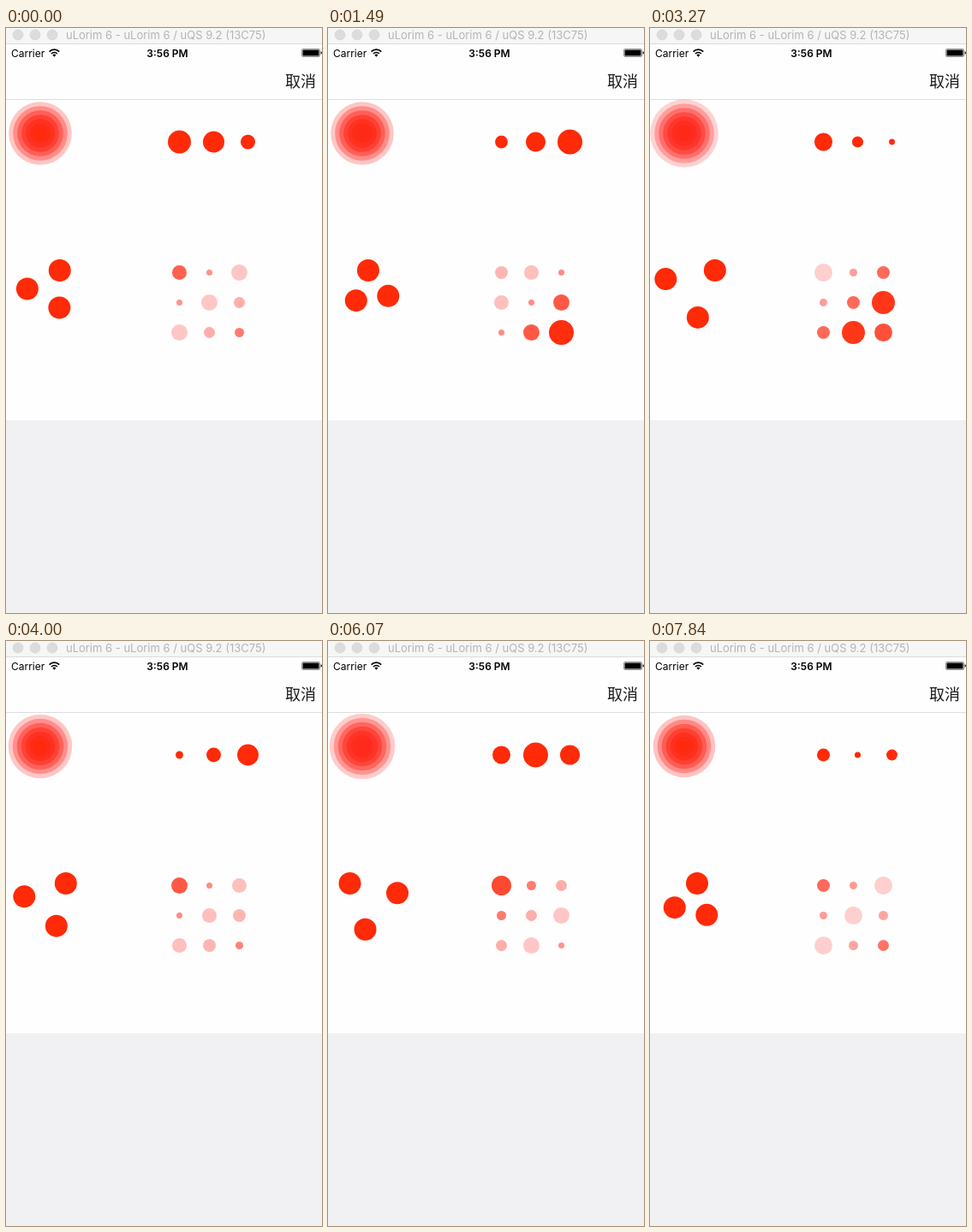
These frames come from a looping animation (369 by 683 pixels, 7990 ms). An HTML page with a canvas:

```html
<!DOCTYPE html>
<html lang="zh-CN">
<head>
<meta charset="utf-8">
<title>Loading indicators</title>
<style>
  html, body { margin: 0; width: 100%; height: 100%; overflow: hidden; background: #f1f1f3; }
  svg, canvas { position: absolute; left: 0; top: 0; width: 369px; height: 683px; display: block; }
  text { font-family: Inter, Roboto, sans-serif; }
  .title { font-size: 13px; fill: #b4b4b4; }
  .status { font-size: 12px; }
  .time { font-weight: 600; text-anchor: middle; }
  .cancel { font: 18px "Noto Sans CJK SC", "Noto Sans CJK", sans-serif; fill: #1c1c1c; }
</style>
</head>
<body>
<svg viewBox="0 0 369 683">
  <rect width="369" height="18" fill="#f6f6f6"/>
  <rect y="18" width="369" height="1" fill="#dcdcdc"/>
  <rect y="19" width="369" height="439" fill="#fefefe"/>
  <rect y="83" width="369" height="1" fill="#dedede"/>
  <g fill="#dcdcdc" stroke="#d2d2d2" stroke-width=".6">
    <circle cx="14" cy="8" r="6"/>
    <circle cx="34" cy="8" r="6"/>
    <circle cx="54" cy="8" r="6"/>
  </g>
  <text class="title" x="70" y="13">uLorim 6 - uLorim 6 / uQS 9.2 (13C75)</text>
  <text class="status" x="6" y="34">Carrier</text>
  <g fill="none" stroke="#000" stroke-width="1.7">
    <path d="M50.6 27.6a8.2 8.2 0 0 1 11.6 0"/>
    <path d="M52.9 30a5 5 0 0 1 7 0"/>
  </g>
  <path d="M54.4 31.5a2.9 2.9 0 0 1 4 0l-2 2.2z"/>
  <text class="status time" x="188.5" y="34">3:56 PM</text>
  <rect x="345.5" y="24.5" width="21" height="9" rx="1.5" fill="none" stroke="#777" stroke-width=".8"/>
  <rect x="346.5" y="25.5" width="19" height="7" rx=".6"/>
  <path d="M367.6 27.3q1.4 .3 1.4 1.7t-1.4 1.7z"/>
  <text class="cancel" x="326" y="68.5">取消</text>
</svg>
<canvas></canvas>
<script>
  const LOOP = 7990, FRAMES = 54, FRAME_MS = 147.9, STEP = 0.15;
  const canvas = document.querySelector('canvas');
  const ctx = canvas.getContext('2d');
  const dpr = window.devicePixelRatio || 1;
  canvas.width = 369 * dpr;
  canvas.height = 683 * dpr;
  ctx.scale(dpr, dpr);

  const mod = (a, n) => ((a % n) + n) % n;
  const mix = (a, b, p) => a + (b - a) * p;
  // There-and-back ramp: 0 at 0, 1 at half, 0 at 2 * half.
  const pingPong = (t, half) => {
    const u = mod(t, 2 * half);
    return u < half ? u / half : 2 - u / half;
  };
  const fade = p => mix(1, 0.2, p);
  const shrink = t => mix(1, 0.2, pingPong(t, 0.6));

  // cubic-bezier(.42, 0, .58, 1)
  function easeInOut(x) {
    let lo = 0, hi = 1;
    for (let i = 0; i < 24; i++) {
      const s = (lo + hi) / 2;
      const bx = 3 * s * (1 - s) * mix(0.42, 0.58, s) + s * s * s;
      if (bx < x) lo = s; else hi = s;
    }
    return lo * lo * (3 - 2 * lo);
  }

  function dot(x, y, r, alpha = 1) {
    ctx.fillStyle = `rgba(255, 42, ${Math.round(mix(48, 8, alpha))}, ${alpha})`;
    ctx.beginPath();
    ctx.arc(x, y, r, 0, 2 * Math.PI);
    ctx.fill();
  }

  function drawPulse(t) {
    for (let i = 0; i < 8; i++) {
      const p = mod(t + 3.68 - i * 0.5, 4) / 4;
      dot(40, 123, 40 * p, fade(p));
    }
  }

  function drawWave(t) {
    for (let i = 0; i < 3; i++) {
      dot(202.5 + 40 * i, 133, 15 * shrink(t + 0.077 - 0.2 * i));
    }
  }

  function drawTriangle(t) {
    const corners = [[12.5, 283], [87.5, 283], [50, 348]];
    const p = easeInOut(mod(t - 0.319, 0.8) / 0.8);
    corners.forEach(([x, y], i) => {
      const [nx, ny] = corners[(i + 1) % 3];
      dot(mix(x, nx, p), mix(y, ny, p), 13);
    });
  }

  function drawGrid(t) {
    for (let row = 0; row < 3; row++) {
      for (let col = 0; col < 3; col++) {
        const g = pingPong(t + 1.675 - 0.3 * (row + col), 1);
        dot(202.5 + 35 * col, 285.5 + 35 * row, 15 * shrink(g), fade(g));
      }
    }
  }

  function draw(now) {
    const frame = Math.min(FRAMES - 1, Math.floor(mod(now, LOOP) / FRAME_MS));
    const t = frame * STEP;
    ctx.clearRect(0, 0, 369, 683);
    drawPulse(t);
    drawWave(t);
    drawTriangle(t);
    drawGrid(t);
  }

  const start = performance.now();
  function tick() {
    draw(performance.now() - start);
    requestAnimationFrame(tick);
  }
  tick();
</script>
</body>
</html>
```
